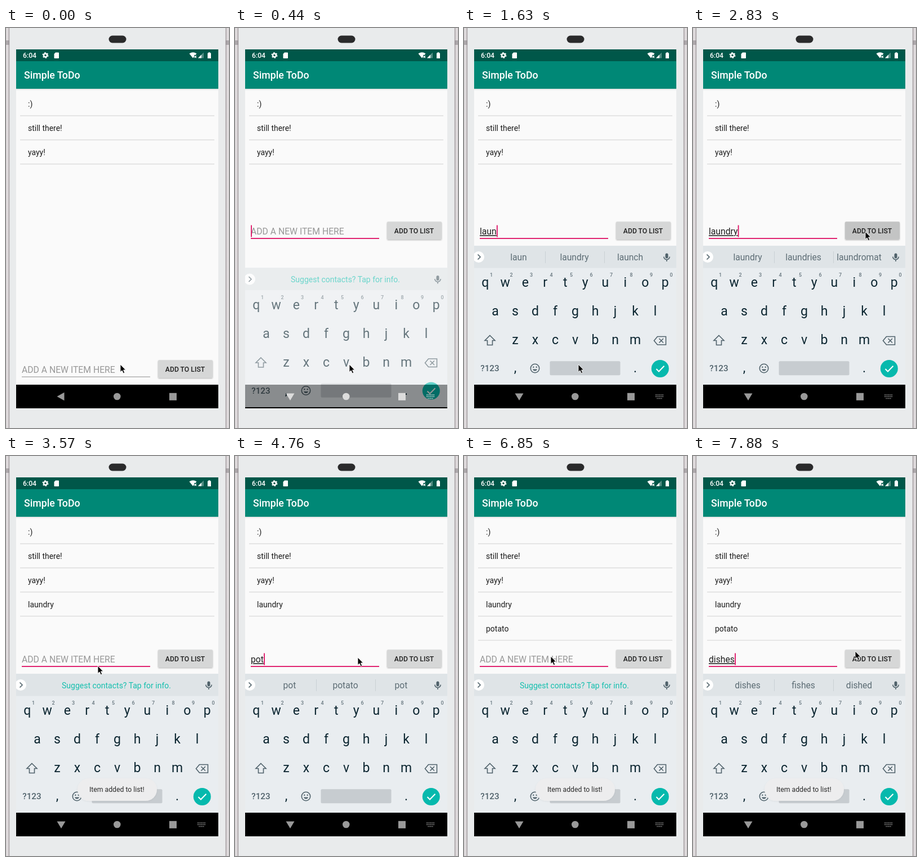
Write an HTML page that moves like this. It is 396 by 711 pixels and loops after 8000 ms.

```html
<!DOCTYPE html>
<html lang="en">
<head>
<meta charset="utf-8">
<title>To-do list</title>
<style>
html, body { margin: 0; width: 100%; height: 100%; overflow: hidden; background: #e9ebec; }
svg { display: block; width: 396px; height: 711px; font-family: Roboto, sans-serif; }
.m { font-weight: 500; }
.mid { text-anchor: middle; }
.item { font-size: 13.97px; fill: #1d1d1d; }
.key { font-size: 23px; fill: #0b2530; }
.num { font-size: 9px; fill: #66757d; font-weight: 500; }
.hint { font-size: 15.6px; fill: #5c6c74; }
.entry { font-size: 15.72px; }
.line { fill: none; stroke: #50626b; stroke-width: 1.6; }
</style>
</head>
<body>
<svg viewBox="0 0 396 711">
  <defs>
    <clipPath id="screen"><rect x="18" y="38" width="359" height="638"/></clipPath>
    <linearGradient id="edge">
      <stop offset="0" stop-color="#c3bec0"/><stop offset=".2" stop-color="#e6e2e4"/>
      <stop offset=".6" stop-color="#d6d1d3"/><stop offset=".75" stop-color="#a09a9d"/>
      <stop offset="1" stop-color="#eeeeef"/>
    </linearGradient>
    <linearGradient id="shade" x2="0" y2="1">
      <stop offset="0" stop-opacity=".12"/><stop offset="1" stop-opacity="0"/>
    </linearGradient>
    <filter id="soft" x="-10%" y="-30%" width="120%" height="180%">
      <feDropShadow dx="0" dy="1.2" stdDeviation="1" flood-opacity=".3"/>
    </filter>
    <filter id="faint" x="-10%" y="-30%" width="120%" height="180%">
      <feDropShadow dx="0" dy="1" stdDeviation="1.5" flood-opacity=".06"/>
    </filter>
  </defs>

  <!-- phone body -->
  <rect width="396" height="711" fill="#e9ebec"/>
  <g id="side">
    <rect width="7" height="711" fill="url(#edge)"/>
    <rect y="22" width="6" height="8" fill="#8d878a" opacity=".6"/>
  </g>
  <use href="#side" transform="matrix(-1 0 0 1 396 0)"/>
  <rect x="182.500" y="13.500" width="31" height="13" rx="6.500" fill="#2a2a2b"/>

  <g clip-path="url(#screen)">
    <rect x="18" y="38" width="359" height="638" fill="#fafafa"/>
    <rect x="18" y="108" width="359" height="3" fill="url(#shade)"/>
    <rect x="18" y="59" width="359" height="49" fill="#008876"/>
    <rect x="18" y="38" width="359" height="21" fill="#005749"/>
    <text class="m" x="32" y="90" font-size="17.800" fill="#fff">Simple ToDo</text>
    <g fill="#fff">
      <text class="m" x="30" y="53" font-size="12.200">6:04</text>
      <circle cx="70" cy="48.500" r="3" fill="none" stroke="#fff" stroke-width="2.400"/>
      <circle cx="70" cy="48.500" r="4.700" fill="none" stroke="#fff" stroke-width="1.600" stroke-dasharray="2.460"/>
      <path d="M88 43.500h5a1 1 0 0 1 1 1v8.500a1 1 0 0 1-1 1h-6.500a1 1 0 0 1-1-1V46z"/>
      <path d="M325.500 45.500q6.500-4.500 13 0l-2 2.500h-2.500v3l-2 2.500z"/>
      <path d="M334.500 49.500l3.500 3.500m0-3.500l-3.500 3.500" stroke="#fff" stroke-width="1.200"/>
      <path d="M341 53.500l10-10v10z" opacity=".35"/>
      <path d="M341 53.500l6-6v6z"/>
      <path d="M358 44.500h1.500v-1.200h3v1.200h1.500v9.500h-6z"/>
    </g>

    <g id="list"></g>

    <g id="form">
      <text id="prompt" class="entry" x="28" y="613.300" fill="#989898">ADD A NEW ITEM HERE</text>
      <text id="entry" class="entry" x="28" y="613.300" fill="#1d1d1d" text-decoration="underline"></text>
      <rect id="rule" x="28" width="228"/>
      <rect id="caret" y="596.500" width="1.800" height="21" fill="#de0f63"/>
      <rect id="button" x="270" y="590.300" width="97" height="31.500" rx="1.800" filter="url(#soft)"/>
      <text class="m mid" x="318" y="611" font-size="12.230" fill="#202020">ADD TO LIST</text>
    </g>

    <g id="board">
      <rect x="18" y="387" width="359" height="300" fill="#e9edf0"/>
      <rect x="18" y="387" width="359" height="39.500" fill="#dfe4e7"/>
      <circle cx="26" cy="407" r="10" fill="#fff"/>
      <path class="line" d="M24.500 402.500l4.500 4.500-4.500 4.500" stroke-width="1.800"/>
      <rect x="357.500" y="400.500" width="5" height="9" rx="2.500" fill="#50626b"/>
      <path class="line" d="M354.800 406.500a5.200 5.200 0 0 0 10.400 0M360 411.500v3.500"/>
      <text id="tip" class="mid" x="196" y="412.500" font-size="14" fill="#14bfae">Suggest contacts? Tap for info.</text>
      <g id="hints">
        <path d="M144.500 397v21M249.500 397v21" stroke="#c9d0d4"/>
        <text class="hint mid" x="97" y="413"></text>
        <text class="hint mid" x="196" y="413"></text>
        <text class="hint mid" x="295" y="413"></text>
        <g id="spud" transform="translate(196 407.500) rotate(-38)">
          <ellipse rx="9.200" ry="6.200" fill="#b5853f"/>
          <ellipse cx="-.5" cy="-1" rx="7.500" ry="4.500" fill="#d6ad64"/>
          <path d="M-4 0h1.500M1-2h1.500M3 1.500h1.500" stroke="#94702c"/>
        </g>
      </g>
      <g id="keys"></g>
      <path class="line" d="M46 546.500l9 9h-4.500v8h-9v-8h-4.500z"/>
      <path class="line" d="M343.500 548.500h15v14.500h-15l-6-7.250zM346.500 552l7.500 7.500m0-7.500l-7.500 7.500"/>
      <text class="m mid" x="46" y="610" font-size="15.200" fill="#50626b">?123</text>
      <text class="key mid" x="91" y="612" font-size="20">,</text>
      <text class="key mid" x="304" y="612" font-size="20">.</text>
      <circle class="line" cx="126" cy="605" r="7.700"/>
      <path d="M122 606.500a4.200 4.200 0 0 0 8 0z" fill="#50626b"/>
      <circle cx="123.300" cy="602.800" r="1.200" fill="#50626b"/>
      <circle cx="128.700" cy="602.800" r="1.200" fill="#50626b"/>
      <rect x="152.500" y="592.300" width="125" height="25" rx="2" fill="#c7ccd0"/>
      <circle cx="348.300" cy="605.500" r="15.500" fill="#06b9ad"/>
      <path d="M341.500 606l4.500 4.500 9.500-9.800" fill="none" stroke="#fff" stroke-width="2"/>
    </g>
    <!-- fades the sliding keyboard above the navigation bar -->
    <rect id="veil" x="18" y="387" width="359" height="247" fill="#fafafa"/>

    <g id="toast">
      <rect x="127" y="573" width="141" height="40" rx="20" fill="#ededee" filter="url(#faint)"/>
      <text x="148" y="597" font-size="12.230" fill="#2b2b2b">Item added to list!</text>
    </g>

    <rect id="nav" x="18" y="634" width="359" height="42"/>
    <rect x="18" y="674" width="359" height="2"/>
    <g id="icons">
      <path id="back"/>
      <circle cx="197.300" cy="655" r="6.300"/>
      <rect x="290" y="648.800" width="13" height="13"/>
      <path id="toggle" d="M340 652.300h14M340 655.300h14M342.500 658.500h9" stroke-width="1.500" stroke-dasharray="1.500 1"/>
    </g>
  </g>
  <path id="mouse" d="M0 0V13.600L3.100 10.800 5.300 15.800 7.700 14.700 5.500 9.900H9.600Z" stroke="#fff" stroke-width=".9"/>
</svg>
<script>
const LOOP = 8000, TICK = 148.7, PITCH = 35.5;
const $ = id => document.getElementById(id);
const set = (id, attrs) => {
  for (const k in attrs) $(id).setAttribute(k, attrs[k]);
};
const show = (id, on) => set(id, { opacity: +on });

// Typed one letter per tick; each entry holds the two other suggestions ('*' is the potato).
const words = [
  { from: 8, to: 20, text: 'laundry', hints: ['lol like', 'last late', 'laugh launch', 'laundry launch',
    'laundry launder', 'laundry laundries', 'laundries laundromat'] },
  { from: 30, to: 43, text: 'potato', hints: ['please put', 'post point', 'potato pot', 'potato potatoes',
    'potato potatoes', '* potatoes'] },
  { from: 48, to: 99, text: 'dishes', hints: ['do did', 'did dinner', 'dish this', 'dishes dishwasher',
    'dishes dished', 'fishes dished'] }
];
// tick, x, y
const path = [
  [0, 203, 598], [15, 203, 598], [18, 306, 362], [21, 306, 362], [24, 163, 373], [27, 218, 358],
  [38, 218, 358], [40, 302, 361], [43, 302, 361], [46, 154, 356], [51, 154, 356], [53, 288, 347]
];
const items = [':)', 'still there!', 'yayy!', 'laundry', 'potato'];

$('list').innerHTML = items.map((s, i) =>
  `<g id="item${i}"><text class="item" x="39" y="${140 + 43 * i}">${s}</text>` +
  `<rect x="25" y="${155.2 + 42.9 * i}" width="345" height="1.500" fill="#dedede"/></g>`).join('');

// Each row is centred on the screen.
const row = (s, y, digits) => [...s].map((c, i) => {
  const x = 197.5 + PITCH * (i - (s.length - 1) / 2);
  return `<text class="key mid" x="${x}" y="${y}">${c}</text>` +
    (digits ? `<text class="num mid" x="${x + 10.7}" y="442">${(i + 1) % 10}</text>` : '');
}).join('');
$('keys').innerHTML = row('qwertyuiop', 460, true) + row('asdfghjkl', 511) + row('zxcvbnm', 562);

const hintTexts = document.querySelectorAll('.hint');

function pointer(n) {
  const i = Math.max(1, path.findIndex(p => p[0] >= n));
  const [a, ax, ay] = path[i - 1], [b, bx, by] = path[i];
  const k = (n - a) / (b - a);
  return [ax + (bx - ax) * k, ay + (by - ay) * k];
}

function toastAlpha(n) {
  if (n >= 44) return n === 44 ? 0.6 : 1;
  if (n < 21 || n > 30) return 0;
  return n === 21 ? 0.6 : n < 28 ? 1 : n < 30 ? 0.85 : 0.3;
}

function draw(n) {
  const focus = n > 0, raised = n > 1, sliding = n === 2 || n === 3;
  const word = words.find(w => n >= w.from && n < w.to);
  const count = word ? Math.min(n - word.from + 1, word.text.length) : 0;
  const typed = word ? word.text.slice(0, count) : '';

  show('item3', n >= 20);
  show('item4', n >= 43);

  set('form', { transform: `translate(0 ${raised ? -246 : 0})` });
  show('prompt', !typed);
  $('entry').textContent = typed;
  set('rule', { y: focus ? 619.2 : 619.5, height: focus ? 1.8 : 1.2, fill: focus ? '#de0f63' : '#a0a0a0' });
  const blinkOff = [6, 7, 22, 23, 24, 25, 28, 29, 37, 45, 46].includes(n);
  show('caret', focus && !blinkOff);
  set('caret', { x: 28.2 + (typed ? $('entry').getComputedTextLength() : 0) });
  set('button', { fill: n === 19 || n === 42 ? '#c3c4c4' : '#d6d7d7' });

  const drop = n === 2 ? 90 : n === 3 ? 39.5 : 0;
  set('board', { transform: `translate(0 ${drop})`, opacity: +raised });
  set('veil', { y: 387 + drop, height: 247 - drop, opacity: n === 2 ? 0.75 : n === 3 ? 0.38 : 0 });
  show('tip', !typed);
  show('hints', !!typed);
  if (typed) {
    const [mid, right] = word.hints[count - 1].split(' ');
    [typed, mid === '*' ? '' : mid, right].forEach((s, i) => hintTexts[i].textContent = s);
    show('spud', mid === '*');
  }

  set('toast', { opacity: toastAlpha(n) });
  set('nav', { opacity: sliding ? 0.41 : 1 });
  const tone = sliding ? '#dcdcdc' : '#999';
  set('icons', { fill: tone, stroke: 'none' });
  set('toggle', { stroke: tone, opacity: +raised });
  set('back', { d: raised ? 'M90.500 649.500h15l-7.500 12.500z' : 'M90.500 655l13-7.300v14.600z' });
  set('mouse', { transform: `translate(${pointer(n)})` });
}

let last = -1;
const start = performance.now();
function frame() {
  const t = (performance.now() - start) % LOOP;
  const n = Math.min(53, Math.floor((t + 6) / TICK));
  if (n !== last) draw(last = n);
  requestAnimationFrame(frame);
}
frame();
</script>
</body>
</html>
```
